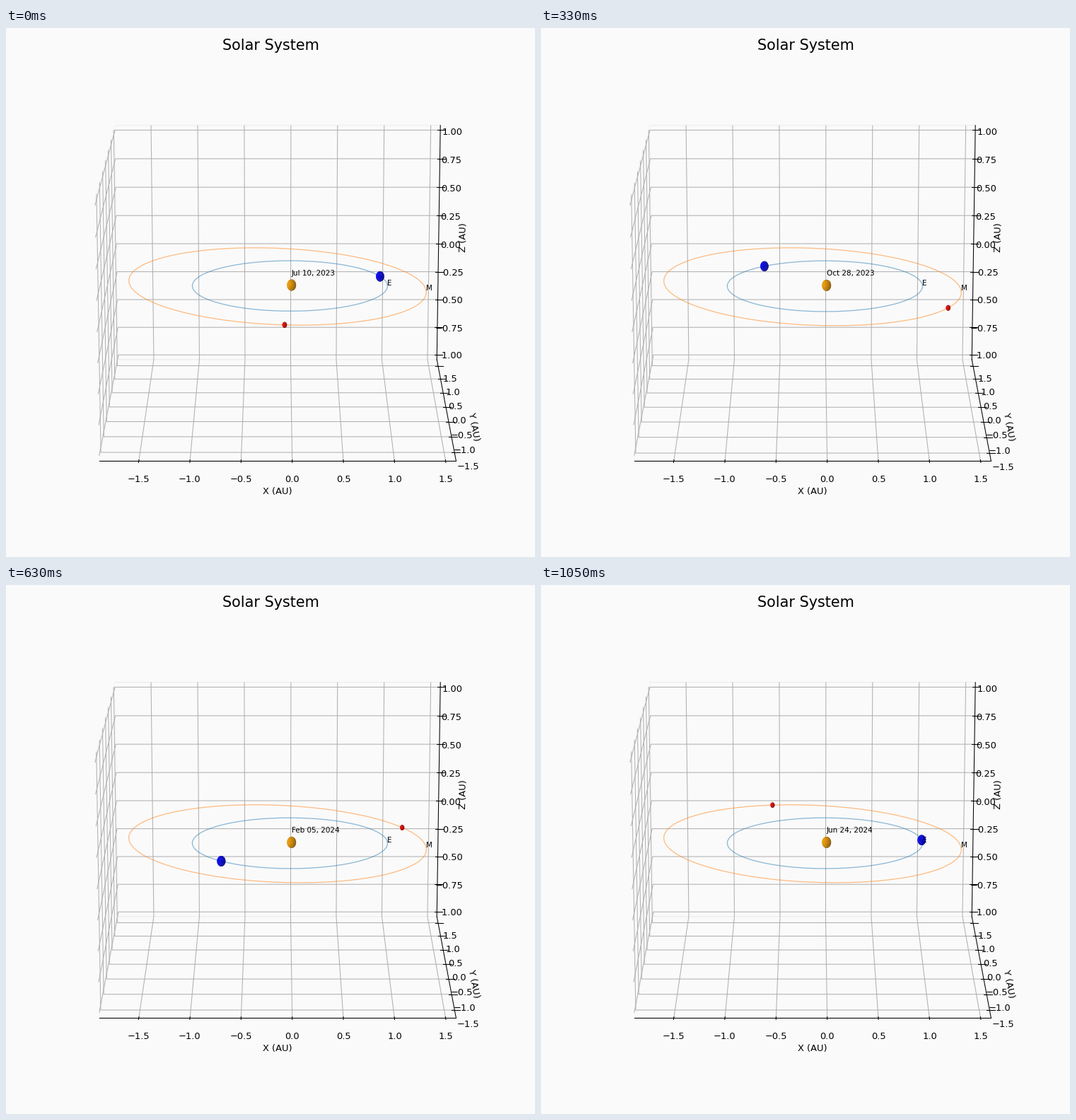
Recreate the animation shown at these times as a matplotlib script. Size 748x748 px, loop 1080 ms.

```python
import numpy as np
import matplotlib.pyplot as plt
from matplotlib.animation import FuncAnimation

FRAMES, INTERVAL, DAYS_PER_FRAME = 36, 30, 10
START = np.datetime64("2023-07-10")
MONTHS = "Jan Feb Mar Apr May Jun Jul Aug Sep Oct Nov Dec".split()
BG = "#fafafa"


class Planet:
    """Kepler orbit with its perihelion on +x, tilted about the y axis."""

    def __init__(self, a, e, tilt, period, anomaly, radius, color, label):
        self.a, self.e, self.tilt = a, e, np.radians(tilt)
        self.period, self.anomaly = period, np.radians(anomaly)
        self.radius, self.color, self.label = radius, color, label

    def point(self, E):
        x = self.a * (np.cos(E) - self.e)
        y = self.a * np.sqrt(1 - self.e**2) * np.sin(E)
        return np.array([x * np.cos(self.tilt), y, -x * np.sin(self.tilt)])

    def at(self, days):
        M = self.anomaly + 2 * np.pi * days / self.period
        E = M
        for _ in range(8):
            E -= (E - self.e * np.sin(E) - M) / (1 - self.e * np.cos(E))
        return self.point(E)


earth = Planet(1.0, 0.0167, 0, 365.256, 20.1, 0.0426, "blue", "E")
mars = Planet(1.5237, 0.0934, 1.85, 686.98, -82.1, 0.0227, "red", "M")
planets = [earth, mars]
SUN_RADIUS = 0.0465

u, v = np.meshgrid(np.linspace(0, 2 * np.pi, 30), np.linspace(0, np.pi, 30),
                   indexing="ij")
BALL = np.array([np.cos(u) * np.sin(v), np.sin(u) * np.sin(v), np.cos(v)])


def sphere(center, radius, color):
    x, y, z = np.reshape(center, (3, 1, 1)) + radius * BALL
    return ax.plot_surface(x, y, z, color=color)


def limits(low, high, margin=0.05):
    pad = margin * (high - low)
    low, high = low - pad, high + pad
    pad = (high - low) / 48
    return low - pad, high + pad


def date_text(days):
    date = START + days
    month = date.astype("datetime64[M]")
    year, m = divmod(int(month.astype(int)), 12)
    day = int((date - month.astype("datetime64[D]")).astype(int)) + 1
    return f"{MONTHS[m]} {day:02d}, {1970 + year}"


fig = plt.figure(figsize=(8, 8), dpi=93.5, facecolor=BG)
fig.suptitle("Solar System", fontsize=16)
ax = fig.add_axes([0, 0, 1, 1], projection="3d", facecolor=BG)
ax.view_init(elev=15, azim=-90)
ax.set(xlabel="X (AU)", ylabel="Y (AU)", zlabel="Z (AU)")
for axis in (ax.xaxis, ax.yaxis, ax.zaxis):
    axis.pane.fill = False

orbits = [p.point(np.linspace(0, 2 * np.pi, 361)) for p in planets]
for planet, orbit in zip(planets, orbits):
    ax.plot(*orbit, lw=1, alpha=0.5)
    ax.text(*orbit[:, 0], planet.label, fontsize=8)
date_label = ax.text(0, 0, 0.08, "", fontsize=8)
track = np.hstack(orbits)
bodies = []


def update(i):
    days = i * DAYS_PER_FRAME
    while bodies:
        bodies.pop().remove()
    bodies.append(sphere((0, 0, 0), SUN_RADIUS, "orange"))
    low, high = track.min(axis=1), track.max(axis=1)
    for p in planets:
        pos = p.at(days)
        bodies.append(sphere(pos, p.radius, p.color))
        low = np.minimum(low, pos - p.radius)
        high = np.maximum(high, pos + p.radius)
    date_label.set_text(date_text(days))
    # The view follows the outermost body, so the axes shift a little.
    ax.set_xlim(*limits(low[0], high[0]))
    ax.set_ylim(*limits(low[1], high[1]))
    ax.set_zlim(*limits(-1, 1, 0))


anim = FuncAnimation(fig, update, frames=FRAMES, interval=INTERVAL,
                     repeat=True, repeat_delay=0)
plt.show()
```
